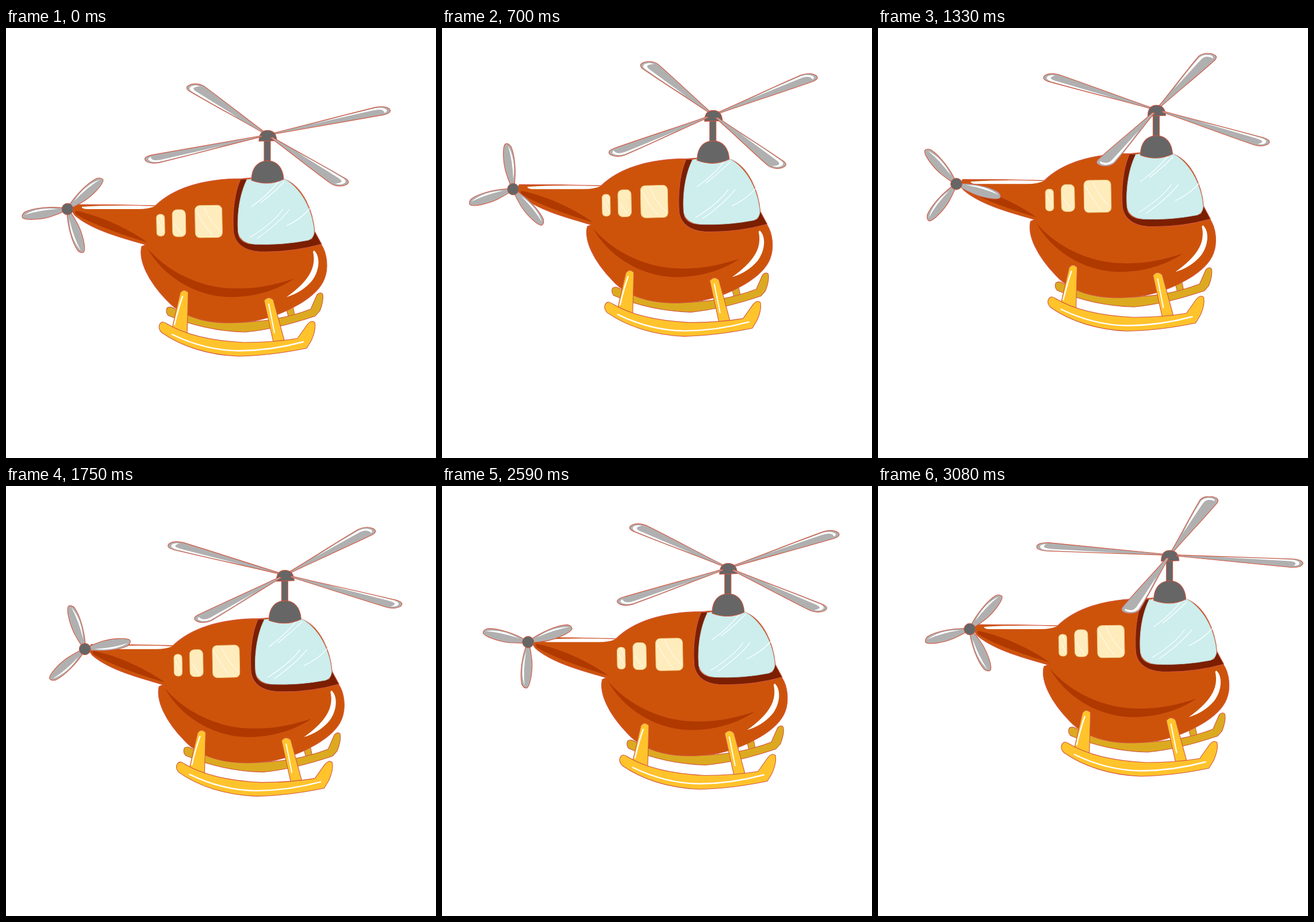
An HTML page with a canvas that plays this animation: 748 by 748 pixels, repeating every 3150 ms.

```html
<!DOCTYPE html>
<html lang="en">
<head>
<meta charset="utf-8">
<title>Helicopter</title>
<style>
  html, body { margin: 0; width: 100%; height: 100%; overflow: hidden; background: #fff; }
  canvas { display: block; width: 748px; height: 748px; }
</style>
</head>
<body>
<canvas id="stage" width="748" height="748"></canvas>
<script>
const ctx = document.getElementById("stage").getContext("2d");
const STEP = 70, STEPS = 45;
const EDGE = "#d2553f", ORANGE = "#cd530b", SHADE = "#b03900", GLASS = "#cdeeed";
const STEEL = "#b0b0b0", IRON = "#666", CREAM = "#ffecbc", YELLOW = "#ffc32c", OCHRE = "#dcaa20";
const RAD = Math.PI / 180;

// Key tables: [step, value]
const driftX = [[0, 0], [10, 16.7], [15, 27], [19, 29.4], [25, 30.3], [30, 33], [45, 54]];
const driftY = [[0, 0], [15, -52], [30, -21], [45, -69.2]];
const mainSpin = [[0, -25], [10, 419.4], [19, 754], [25, 1030.6], [30, 1262.2], [37, 1584.4], [44, 1908.3], [45, 1955]];
const tailSpin = [[0, -40], [10, 411], [19, 737], [25, 859.7], [30, 1114], [37, 1422.3], [44, 1754], [45, 1760]];

function at(keys, s) {
  let i = 1;
  while (i < keys.length - 1 && s > keys[i][0]) i++;
  const [a, u] = keys[i - 1], [b, v] = keys[i];
  return u + (v - u) * (s - a) / (b - a);
}

function shape(d, fill, edge, width = 1.1) {
  const p = new Path2D(d);
  if (fill) { ctx.fillStyle = fill; ctx.fill(p); }
  if (edge) { ctx.strokeStyle = edge; ctx.lineWidth = width; ctx.stroke(p); }
}
const line = (d, width, color = "#fff") => shape(d, null, color, width);

function pane(x, y, w, h, r) {
  const p = new Path2D();
  p.roundRect(-w / 2, -h / 2, w, h, r);
  ctx.save();
  ctx.translate(x + w / 2, y + h / 2);
  ctx.rotate(-0.02);
  ctx.fillStyle = CREAM;
  ctx.fill(p);
  ctx.strokeStyle = "#eccb85";
  ctx.lineWidth = 1;
  ctx.stroke(p);
  ctx.restore();
}

function rearSkid() {
  shape("M487 486L499 484L503 503L492 505Z", OCHRE, EDGE);
  shape("M280 487Q286 483 294 489Q340 509 400 512Q470 512 530 489L541 464Q547 458 551 463Q553 474 546 492L538 501Q470 524 416 529Q345 527 282 500Q277 494 280 487Z", OCHRE, EDGE);
}

function body() {
  shape("M118 307Q190 307 260 309C290 280 340 262 411 262C450 259 475 258 487 264C517 278 534 318 537 354L548 376C559 392 561 418 554 436C542 468 488 498 436 509C360 521 308 505 280 474C247 440 230 404 236 380L243 377C205 366 150 352 120 326Q111 316 118 307Z", ORANGE, EDGE);
  shape("M132 311Q190 307 259 310Q248 315 230 315L140 315Q131 314 132 311Z", "#fff");
  shape("M122 318C165 327 213 349 246 373C200 359 155 343 123 325Q118 320 122 318Z", SHADE);
  shape("M246 383C275 418 325 446 378 452C425 456 462 449 501 436C470 457 430 469 385 468C325 465 272 430 246 383Z", SHADE);
  shape("M536 387C548 398 545 424 532 440Q515 460 488 468Q516 448 527 430Q539 411 534 389Z", "#fff");

  shape("M408 263L421 263C404 300 401 340 405 362Q411 376 432 376Q487 378 532 367L537 354L549 376Q495 391 440 389Q402 386 396 357C393 320 398 285 408 263Z", "#7b1f00", EDGE);
  shape("M419 264Q452 258 483 262C512 277 533 315 536 354Q536 365 526 369Q480 378 432 376Q408 374 404 356C401 320 408 286 419 264Z", GLASS, "#b9d5d3", 1);
  line("M427 311Q455 291 476 265M443 304Q466 286 484 268M425 364Q465 339 481 316M437 366Q474 340 493 316M488 344Q512 333 529 314", 1.2);

  pane(262, 324, 14, 38, 6);
  pane(289.5, 316, 23, 47, 8);
  pane(329, 308.5, 47, 56, 8);
  line("M331 318Q347 348 359 360M345 312Q355 338 374 354M265 336L274 354M293 340L306 358M268 326L275 340", 1);
}

function frontSkid() {
  shape("M303 461Q309 452 317 460L315 533L289 522Z", YELLOW, EDGE);
  line("M307 467Q299 490 293 516", 2.4);
  shape("M449 474Q457 465 465 473L484 543L465 546Z", YELLOW, EDGE);
  line("M457 480L467 530", 2);
  shape("M267 516Q271 508 279 514C310 533 355 544 414 547Q465 547 507 540L524 516Q531 507 537 512Q540 524 531 544L523 557Q460 570 405 571C350 569 304 553 271 530Q264 523 267 516Z", YELLOW, EDGE);
  line("M289 533C330 553 368 561 405 561.5Q462 561 517 546", 2.4);
}

function mast() {
  shape("M449 195H460V234H449Z", IRON, EDGE);
  shape("M427 265C427 242 439 231 455 231C472 231 482 244 483 263Q456 276 427 265Z", IRON, EDGE);
}

// Blades live on a flat disc seen at a slant, so width foreshortens with angle.
function mainBlade(deg) {
  const flat = new DOMMatrix().translate(455, 186).scale(1, 0.457).rotate(deg);
  const put = d => {
    const p = new Path2D();
    p.addPath(new Path2D(d), flat);
    return p;
  };
  const blade = put("M12 -2C70 -5 140 -12 215 -16Q233 -15 234 0Q233 15 215 16C140 12 70 5 12 2Z");
  const shine = put("M85 -4Q150 -11 213 -13Q228 -11 228 1Q227 8 219 10Q223 3 220 -3Q216 -7 205 -7Q150 -6 85 -4Z");
  ctx.fillStyle = STEEL;
  ctx.fill(blade);
  ctx.strokeStyle = EDGE;
  ctx.lineWidth = 1.1;
  ctx.stroke(blade);
  ctx.fillStyle = "#fff";
  ctx.fill(shine);
}

function mainRotor(spin) {
  const blades = [0, 80, 180, 260].map(d => spin + d);
  const isFront = d => Math.sin(d * RAD) > 0;
  blades.filter(d => !isFront(d)).forEach(mainBlade);
  shape("M440 197Q440 178 455 178Q470 178 471 196Z", IRON, EDGE);
  blades.filter(isFront).forEach(mainBlade);
}

function tailRotor(spin) {
  [[0, 1], [110, -1], [210, -1]].forEach(([offset, side]) => {
    ctx.save();
    ctx.translate(107, 315);
    ctx.rotate((spin + offset) * RAD);
    ctx.scale(1, side);
    shape("M6 -3C25 -9 55 -13 74 -8Q81 -4 80 1C76 7 50 10 32 8Q18 6 6 3Z", STEEL, EDGE);
    shape("M17 -3Q50 -13 76 -3Q50 -7 17 -3Z", "#fff");
    ctx.restore();
  });
  ctx.beginPath();
  ctx.arc(107, 315, 10, 0, 7);
  ctx.fillStyle = IRON;
  ctx.fill();
  ctx.strokeStyle = EDGE;
  ctx.lineWidth = 1;
  ctx.stroke();
}

function draw(s) {
  ctx.fillStyle = "#fff";
  ctx.fillRect(0, 0, 748, 748);
  ctx.save();
  ctx.translate(at(driftX, s), at(driftY, s));
  ctx.beginPath();
  ctx.rect(0, 84, 748, 600);
  ctx.clip();
  ctx.lineJoin = ctx.lineCap = "round";
  rearSkid();
  body();
  frontSkid();
  mast();
  tailRotor(at(tailSpin, s));
  mainRotor(at(mainSpin, s));
  ctx.restore();
}

const start = performance.now();
function tick() {
  draw(Math.floor((performance.now() - start) / STEP) % STEPS);
  requestAnimationFrame(tick);
}
tick();
</script>
</body>
</html>
```
